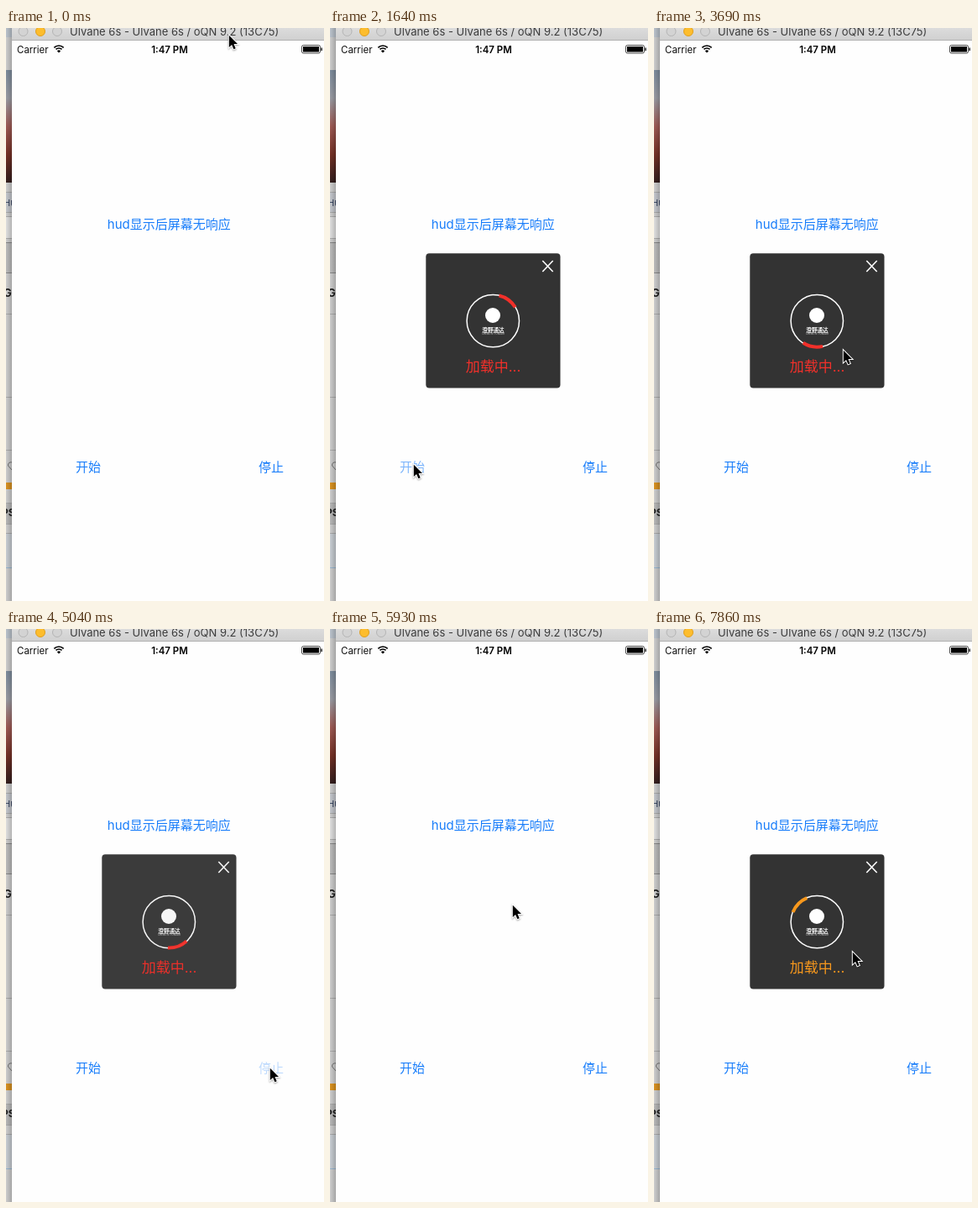
Recreate the animation shown at these times as an HTML page with a canvas. Size 379x682 px, loop 8 s.

```html
<!DOCTYPE html>
<html lang="zh">
<head>
<meta charset="utf-8">
<title>HUD demo</title>
<style>
html, body { margin: 0; width: 100%; height: 100%; overflow: hidden; background: #fff; }
canvas { display: block; width: 379px; height: 682px; }
</style>
</head>
<body>
<canvas id="stage"></canvas>
<script>
const W = 379, H = 682, LOOP = 8000, FIRST = 450, STEP = 148;
const SANS = 'Inter, "Noto Sans CJK SC", "Noto Sans CJK", sans-serif';
const BLUE = '#187dfa', RED = '#f2302a', ORANGE = '#f7981d';
const canvas = document.getElementById('stage');
const ctx = canvas.getContext('2d');
const dpr = window.devicePixelRatio || 1;
canvas.width = W * dpr;
canvas.height = H * dpr;

// Pointer tip: step, x, y
const POINTER = [
  [-1, 265, 8], [1, 232, 110], [4, 122, 440], [6, 99, 519], [11, 99, 519],
  [15, 200, 421], [18, 225, 383], [23, 225, 383], [29, 314, 522], [32, 314, 522],
  [37, 217, 328], [38, 211, 258], [39, 208, 226], [43, 208, 226],
  [46, 224, 356], [48, 236, 384]
];

// Button opacity from the step of the press onwards
const BUTTONS = [
  { text: 'hud显示后屏幕无响应', x: 194.3, y: 239, press: 41, fade: [.2, .42, .75, .93] },
  { text: '开始', x: 98, y: 528, press: 7, fade: [.2, .57, .86] },
  { text: '停止', x: 316, y: 528, press: 30, fade: [.2, .28, .65, .9] }
];

const HUDS = [
  { from: 8, hide: 31, angle: 36, color: RED },
  { from: 42, hide: 99, angle: 21, color: ORANGE }
];
const HUD_FADE = [.955, .6, .18];
const TURN = 36.7;

function rect(x, y, w, h, fill) {
  ctx.fillStyle = fill;
  ctx.fillRect(x, y, w, h);
}

function text(s, x, y, font, fill, align = 'left') {
  ctx.font = font + ' ' + SANS;
  ctx.fillStyle = fill;
  ctx.textAlign = align;
  ctx.fillText(s, x, y);
}

function arc(x, y, r, a, b, color, width) {
  ctx.beginPath();
  ctx.arc(x, y, r, a, b);
  ctx.strokeStyle = color;
  ctx.lineWidth = width;
  ctx.stroke();
}

function disc(x, y, r, fill) {
  ctx.beginPath();
  ctx.arc(x, y, r, 0, 7);
  ctx.fillStyle = fill;
  ctx.fill();
}

function gradient(x0, y0, x1, y1, ...colors) {
  const g = ctx.createLinearGradient(x0, y0, x1, y1);
  colors.forEach((c, i) => g.addColorStop(i / (colors.length - 1), c));
  return g;
}

function drawBackdrop() {
  ctx.save();
  ctx.beginPath();
  ctx.rect(0, 0, 7, H);
  ctx.clip();
  rect(0, 0, 7, H, '#d9d9d9');
  rect(0, 0, 7, 11, '#c5ced8');
  rect(0, 50, 7, 134, gradient(0, 50, 0, 184, '#8494a6', '#a3a5ad', '#a8605a', '#7c3428', '#35201f'));
  rect(0, 196, 7, 24, '#cfd2d8');
  for (const y of [195, 219, 224, 250, 340, 439, 502, 565, 590, 601]) rect(0, y, 7, 1, '#b3b3b3');
  text('Hu', -3, 212, '11px', '#33425f');
  rect(0, 225, 7, 25, '#ececec');
  rect(0, 255, 7, 37, '#c6c6c6');
  rect(0, 255, 7, 1, '#8f8f8f');
  rect(0, 291, 7, 1, '#8f8f8f');
  text('G', -3, 320, 'bold 13px', '#222');
  ctx.beginPath();
  ctx.moveTo(8, 527);
  ctx.lineTo(2.5, 521);
  ctx.quadraticCurveTo(2, 516, 8, 517);
  ctx.strokeStyle = '#777';
  ctx.lineWidth = 1;
  ctx.stroke();
  rect(0, 541, 7, 8, '#e59a22');
  rect(0, 566, 7, 24, '#c2c2c2');
  text('PS', -5, 581, 'bold 12px', '#222');
  rect(0, 602, 7, 40, '#d3d9df');
  rect(0, 642, 7, 1, '#9fc0dc');
  rect(0, 0, 7, H, gradient(0, 0, 7, 0, 'rgba(0,0,0,.06)', 'rgba(0,0,0,.24)'));
  ctx.restore();
}

function drawWindow() {
  rect(7, 0, W - 7, H, '#fefefe');
  rect(7, 0, W - 7, 14, gradient(0, 0, 0, 14, '#dcdcdc', '#d0d0d0'));
  rect(7, 14, W - 7, 1, '#b1b1b1');
  for (const [x, fill, line] of [[20.5, '#d3d3d3', '#b5b5b5'], [41, '#fdbd2d', '#dfa023'], [61, '#d3d3d3', '#b5b5b5']]) {
    disc(x, 4, 5.7, fill);
    arc(x, 4, 5.5, 0, 7, line, 1);
  }
  text('Ulvane 6s - Ulvane 6s / oQN 9.2 (13C75)', 76, 9, '13px', '#3c3c3c');

  text('Carrier', 13, 29.5, '11.5px', '#111');
  text('1:47 PM', 195, 29.5, '600 11.5px', '#000', 'center');
  for (const r of [8, 5]) arc(63, 29, r, -Math.PI * .75, -Math.PI * .25, '#000', 1.7);
  ctx.beginPath();
  ctx.moveTo(63, 29.5);
  ctx.arc(63, 29.5, 3, -Math.PI * .75, -Math.PI * .25);
  ctx.fillStyle = '#000';
  ctx.fill();
  ctx.strokeStyle = '#000';
  ctx.lineWidth = .7;
  ctx.beginPath();
  ctx.roundRect(352.5, 20.5, 22, 9.5, 2);
  ctx.stroke();
  rect(354, 22, 19, 6.5, '#000');
  rect(375.5, 23.5, 1.3, 3.5, '#000');
}

function drawButton(b, i) {
  ctx.globalAlpha = b.fade[i - b.press] ?? 1;
  text(b.text, b.x, b.y, '15px', BLUE, 'center');
  ctx.globalAlpha = 1;
}

function hudLayer(h, i) {
  ctx.beginPath();
  ctx.roundRect(114.3, 268.3, 160.2, 160.2, 4);
  ctx.fillStyle = '#333';
  ctx.fill();

  ctx.beginPath();
  ctx.moveTo(253.3, 277);
  ctx.lineTo(265.7, 290);
  ctx.moveTo(265.7, 277);
  ctx.lineTo(253.3, 290);
  ctx.strokeStyle = '#fff';
  ctx.lineWidth = 1.6;
  ctx.stroke();

  disc(194, 342, 9, '#fff');
  text('澄野通达', 194.5, 361.7, 'bold 6.6px', '#fff', 'center');
  text('CHENGYE TONGDA', 194.5, 365.2, '2.9px', '#ddd', 'center');

  const cx = 194.3, cy = 348.6, rad = Math.PI / 180;
  const mid = (h.angle + TURN * (i - h.from) - 90) * rad;
  arc(cx, cy, 31.2, 0, 7, '#fff', 1.5);
  arc(cx, cy, 31, mid - 22.5 * rad, mid + 22.5 * rad, h.color, 4);
  text('加载中...', 194.5, 409, '17px', h.color, 'center');
}

function drawHud(h, i) {
  const alpha = i < h.from ? 0 : i < h.hide ? 1 : HUD_FADE[i - h.hide] ?? 0;
  if (!alpha) return;
  ctx.globalAlpha = alpha;
  hudLayer(h, i);
  ctx.globalAlpha = 1;
}

function pointerAt(i) {
  const n = POINTER.findIndex(k => k[0] > i);
  if (n < 0) return POINTER[POINTER.length - 1].slice(1);
  const a = POINTER[n - 1], b = POINTER[n];
  const p = (i - a[0]) / (b[0] - a[0]);
  return [a[1] + (b[1] - a[1]) * p, a[2] + (b[2] - a[2]) * p];
}

function drawPointer(i) {
  const [x, y] = pointerAt(i);
  ctx.save();
  ctx.translate(x + .8, y + .8);
  ctx.beginPath();
  [[0, 0], [0, 14.2], [3.3, 11.2], [5.6, 16.4], [7.9, 15.4], [5.7, 10.3], [10.2, 10.3]]
    .forEach(p => ctx.lineTo(...p));
  ctx.closePath();
  ctx.shadowColor = 'rgba(0,0,0,.35)';
  ctx.shadowBlur = 2 * dpr;
  ctx.shadowOffsetY = dpr;
  ctx.strokeStyle = '#fff';
  ctx.lineWidth = 2;
  ctx.stroke();
  ctx.shadowColor = 'transparent';
  ctx.fillStyle = '#000';
  ctx.fill();
  ctx.restore();
}

function draw(t) {
  // The screen refreshes in fixed steps after an initial hold
  const i = t < FIRST ? -1 : Math.min(50, Math.floor((t - FIRST + 18) / STEP));
  ctx.setTransform(dpr, 0, 0, dpr, 0, 0);
  drawBackdrop();
  drawWindow();
  BUTTONS.forEach(b => drawButton(b, i));
  HUDS.forEach(h => drawHud(h, i));
  drawPointer(i);
}

const start = performance.now();
function tick() {
  draw((performance.now() - start) % LOOP);
  requestAnimationFrame(tick);
}
tick();
</script>
</body>
</html>
```
